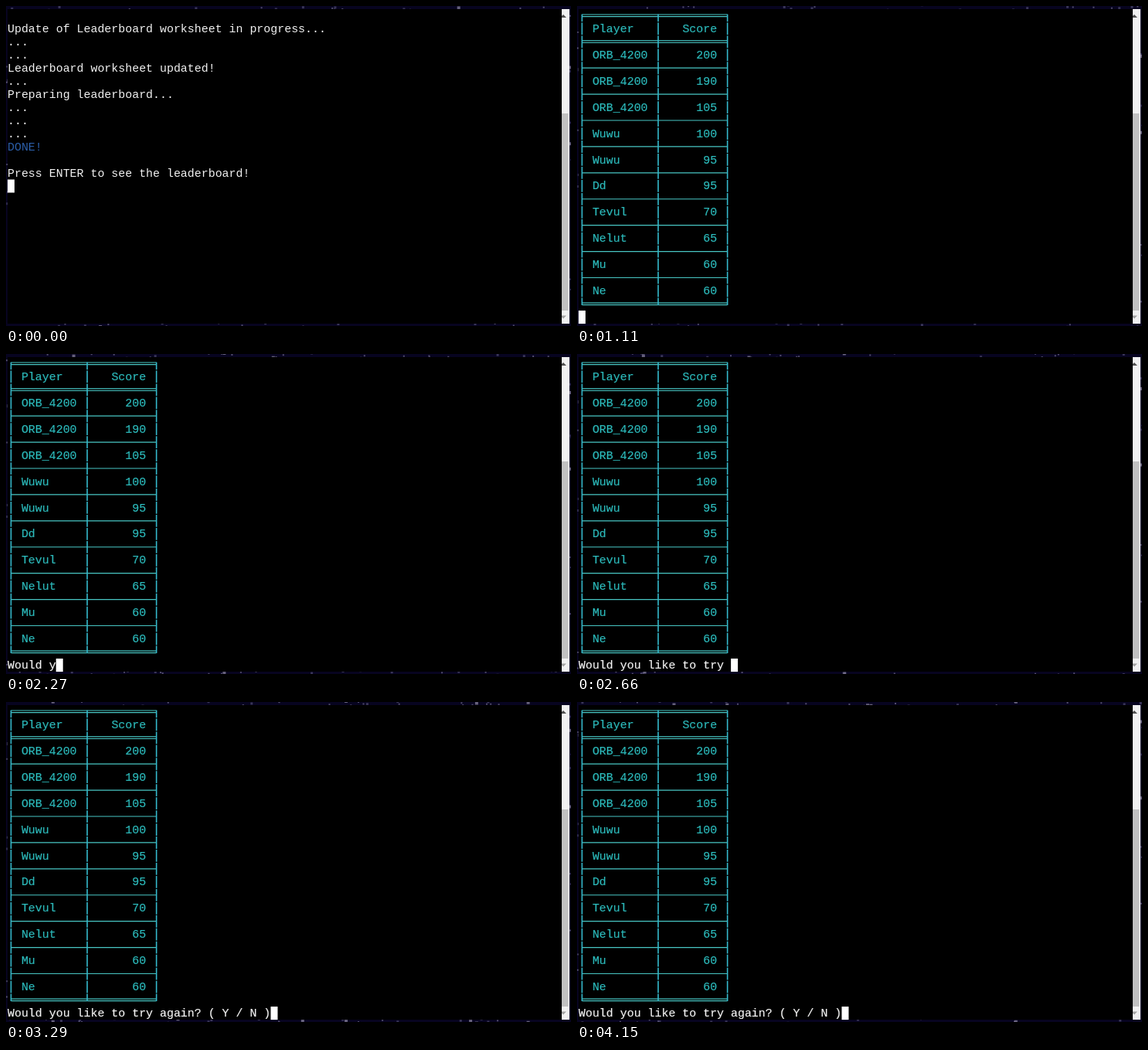
An HTML page that plays this animation: 731 by 414 pixels, repeating every 4.23 s.

```html
<!DOCTYPE html>
<html lang="en">
<head>
<meta charset="utf-8">
<title>Terminal leaderboard</title>
<style>
  html, body { margin: 0; width: 100%; height: 100%; overflow: hidden; background: #070420; }
  svg { display: block; width: 731px; height: 414px; }
  text { font: 14.93px "Courier New", "Liberation Mono", monospace; white-space: pre; }
</style>
</head>
<body>
<svg id="stage" viewBox="0 0 731 414">
  <rect width="731" height="414" fill="#070420"/>
  <g id="sky"></g>
  <rect x="2" y="4" width="727" height="407" fill="#000"/>
  <g id="progress" fill="#f2f2f2"></g>
  <g id="board" fill="#2cb9ba" stroke="#2cb9ba" stroke-width="0.2"></g>
  <text id="prompt" fill="#f2f2f2" stroke="#f2f2f2" stroke-width="0.2"></text>
  <rect id="cursor" width="9" height="17" fill="#fff"/>
  <rect x="719" y="4" width="10" height="407" fill="#f1f1f1"/>
  <rect x="719" y="139" width="8.5" height="255" fill="#c1c1c1"/>
  <path d="M717 15l4-4 4 4z" fill="#505050"/>
  <path d="M717 400.500l4 4 4-4z" fill="#a3a3a3"/>
  <rect x="715" y="4" width="4" height="407" fill="#000"/>
</svg>
<script>
const NS = 'http://www.w3.org/2000/svg';
const LOOP = 4230, CLEAR = 460, TABLE = 1100, TYPE = 2080, PER_CHAR = 25.6;
const CW = 8.96, LH = 16.96, LEFT = 2, TOP = 4;
const QUESTION = 'Would you like to try again? ( Y / N )';
const $ = id => document.getElementById(id);
const colX = c => LEFT + c * CW;
const rowY = r => TOP + r * LH;

function add(parent, tag, attrs, content) {
  const el = document.createElementNS(NS, tag);
  for (const k in attrs) el.setAttribute(k, attrs[k]);
  if (content) el.textContent = content;
  parent.appendChild(el);
  return el;
}

function write(parent, row, col, str, attrs) {
  return add(parent, 'text', { x: colX(col), y: rowY(row) + 13, ...attrs }, str);
}

// Times at which the picture refreshes: [first, last, count]
const ticks = [0];
for (const [a, b, n] of [[90, 550, 7], [640, 640, 1], [790, 1270, 7], [1340, 1790, 7],
  [1880, 2340, 7], [2430, 2890, 7], [2960, 3050, 2], [3200, 3690, 7], [3760, 4150, 6]])
  for (let i = 0; i < n; i++) ticks.push(n > 1 ? a + (b - a) * i / (n - 1) : a);

// Drifting stars, visible only around the terminal
let seed = 17;
const rand = () => (seed = (seed * 16807) % 2147483647) / 2147483647;
const layers = [[900, 2, 40, '#6f6a8c'], [500, 3, 20, '#4f4a70'], [160, 4, 13, '#8d88a2']]
  .map(([count, size, speed, color]) => {
    let d = '';
    for (let i = 0; i < count; i++) {
      const x = (rand() * 731).toFixed(1), y = rand() * 414;
      for (const dy of [0, 414])
        d += `M${x} ${(y + dy).toFixed(1)}h${size}v${size}h-${size}z`;
    }
    return { speed, el: add($('sky'), 'path', { d, fill: color, opacity: 0.7 }) };
  });

// Progress messages
['', 'Update of Leaderboard worksheet in progress...', '...', '...',
  'Leaderboard worksheet updated!', '...', 'Preparing leaderboard...',
  '...', '...', '...', 'DONE!', '', 'Press ENTER to see the leaderboard!']
  .forEach((s, r) => s && write($('progress'), r, 0, s, s === 'DONE!' ? { fill: '#2b5ea8' } : {}));

// Score table
const rows = [['Player', 'Score'], ['ORB_4200', 200], ['ORB_4200', 190], ['ORB_4200', 105],
  ['Wuwu', 100], ['Wuwu', 95], ['Dd', 95], ['Tevul', 70], ['Nelut', 65], ['Mu', 60], ['Ne', 60]];
rows.forEach(([name, score], i) => {
  write($('board'), 2 * i + 1, 2, name);
  write($('board'), 2 * i + 1, 20, String(score), { 'text-anchor': 'end' });
});
const edges = [0.5, 11.5, 21.5].map(colX);
let across = '', down = '';
for (let r = 0; r <= 22; r++) {
  const mid = rowY(r) + 8.3;
  const y0 = r === 0 ? mid - 1.5 : rowY(r) + 0.5;
  const y1 = r === 22 ? mid + 1.5 : rowY(r) + 16.3;
  for (const x of edges) down += `M${x} ${y0}V${y1}`;
  if (r % 2) continue;
  for (const dy of [0, 2, 22].includes(r) ? [-1.3, 1.3] : [0])
    across += `M${edges[0]} ${mid + dy}H${edges[2]}`;
}
add($('board'), 'path', { d: across, stroke: '#48c6c4', fill: 'none', 'stroke-width': 1.2 });
add($('board'), 'path', { d: down, stroke: '#35b9cc', fill: 'none', 'stroke-width': 1.6 });

$('prompt').setAttribute('x', colX(0));
$('prompt').setAttribute('y', rowY(23) + 13);

function show(id, on) {
  $(id).setAttribute('visibility', on ? 'visible' : 'hidden');
}

function draw(ms) {
  const now = ms % LOOP;
  const t = ticks.reduce((last, k) => k <= now ? k : last, 0);
  const typed = Math.max(0, Math.min(QUESTION.length, Math.floor((t - TYPE) / PER_CHAR)));
  const row = t < CLEAR ? 13 : t < TABLE ? 0 : 23;
  for (const { el, speed } of layers)
    el.setAttribute('transform', `translate(0 ${-(t / 1000 * speed)})`);
  show('progress', t < CLEAR);
  show('board', t >= TABLE);
  $('prompt').textContent = QUESTION.slice(0, typed);
  $('cursor').setAttribute('x', colX(typed));
  $('cursor').setAttribute('y', rowY(row));
}

const start = performance.now();
function loop() {
  draw(performance.now() - start);
  requestAnimationFrame(loop);
}
loop();
</script>
</body>
</html>
```
